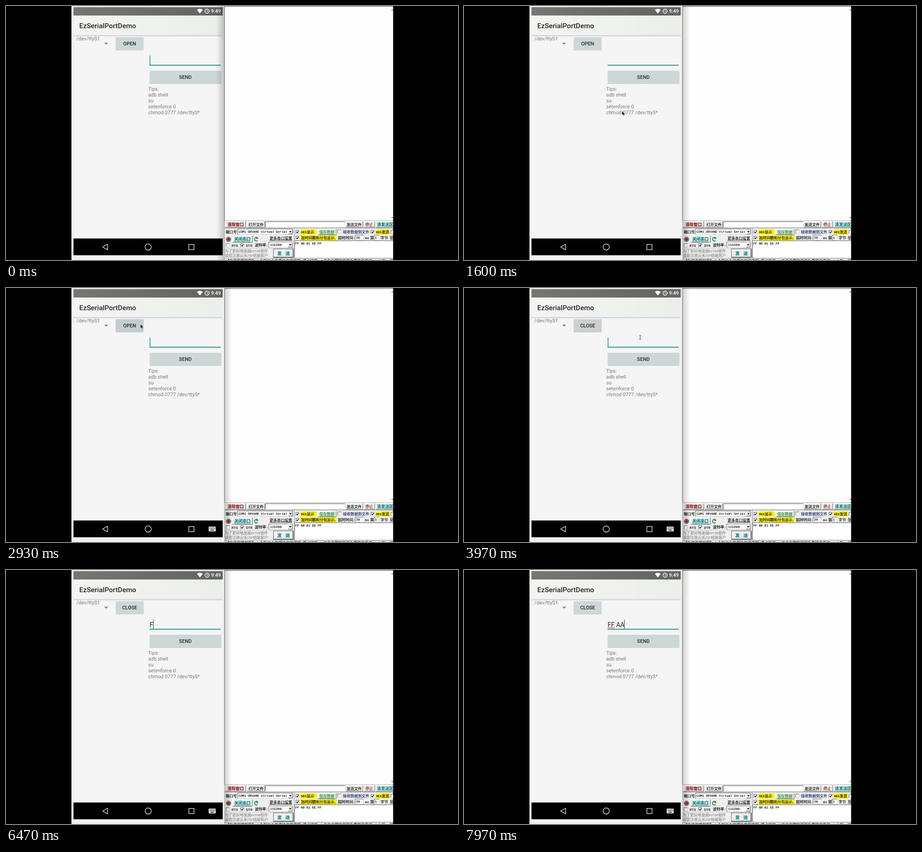
Animation, 998 px wide and 561 px high, one loop 8 s. Source, as an HTML page:

```html
<!DOCTYPE html>
<html lang="zh">
<head>
<meta charset="utf-8">
<title>Serial port demo</title>
<style>
html, body { margin: 0; width: 100%; height: 100%; overflow: hidden; background: #000; }
svg { display: block; width: 100%; height: 100%; }
text { white-space: pre; }
.ui { font-family: Roboto, sans-serif; }
.med { font-weight: 500; }
.cjk { font-family: "Noto Sans CJK SC", "Noto Sans CJK", "Noto Sans CJK JP", sans-serif; }
.mono { font-family: "Liberation Mono", monospace; }
</style>
</head>
<body>
<svg id="stage" viewBox="0 0 998 561">
  <defs>
    <linearGradient id="status"><stop offset="0" stop-color="#777670"/><stop offset="1" stop-color="#62645f"/></linearGradient>
    <linearGradient id="bar"><stop offset="0" stop-color="#f4f4f1"/><stop offset="1" stop-color="#ebefe9"/></linearGradient>
    <linearGradient id="drop" x2="0" y2="1"><stop offset="0" stop-color="#bfc5da"/><stop offset="1" stop-color="#f5f5f5"/></linearGradient>
    <linearGradient id="shadeLeft"><stop offset="0" stop-opacity="0"/><stop offset="1" stop-opacity=".2"/></linearGradient>
    <linearGradient id="shadeRight"><stop offset="0" stop-opacity=".17"/><stop offset="1" stop-opacity="0"/></linearGradient>
    <clipPath id="win"><rect x="144.5" width="710" height="561"/></clipPath>
  </defs>
  <g id="scene" clip-path="url(#win)"></g>
  <rect id="terminalShadow" x="464" width="18" height="561" fill="url(#shadeLeft)"/>
  <rect id="phoneShadow" x="483" width="16" height="561" fill="url(#shadeRight)"/>
  <text id="entry" class="ui" x="317" y="125.7" font-size="14" fill="#222"></text>
  <rect id="spell" x="317" y="126.8" width="15.5" height="1.7" fill="#ee7450"/>
  <rect id="caret" y="109.5" width="1.5" height="20.5" fill="#148a88"/>
  <path id="arrow" d="M0 0V9.2L2.1 7.3 3.6 10.6 5.2 9.9 3.8 6.8H6.5Z" fill="#111" stroke="#fff" stroke-width=".5"/>
  <path id="beam" d="M-2-4.5H-.6L0-4 .6-4.5H2M0-4V4M-2 4.5H-.6L0 4 .6 4.5H2" fill="none" stroke="#444" stroke-width="1"/>
</svg>
<script>
const $ = id => document.getElementById(id);
const LOOP = 8000;
const TEAL = '#087f86', RED = '#8e1d1d', INK = '#111';

const rect = (x, y, w, h, fill, more = '') =>
  `<rect x="${x}" y="${y}" width="${w}" height="${h}" fill="${fill}" ${more}/>`;
const path = (d, stroke, width = 1, more = 'fill="none"') =>
  `<path d="${d}" stroke="${stroke}" stroke-width="${width}" ${more}/>`;
const ui = (x, y, size, fill, str, more = 'class="ui"') =>
  `<text x="${x}" y="${y}" font-size="${size}" fill="${fill}" ${more}>${str}</text>`;

// Half-width Latin inside full-width Chinese, as in a bitmap system font.
function label(x, y, str, fill = INK, size = 8.3, more = '') {
  const runs = str.replace(/[ -~]+/g, s => `<tspan class="mono" font-size="${size * .83}">${s}</tspan>`);
  return `<text class="cjk" x="${x}" y="${y}" font-size="${size}" fill="${fill}" stroke="${fill}" stroke-width=".2" ${more}>${runs}</text>`;
}
const bold = 'font-weight="700"';
const rule = (x, y, w, color) => rect(x, y, w, .8, color);

const bevel = (x, y, w, h) => rect(x, y, w, h, '#efefed') +
  path(`M${x} ${y + h}V${y}H${x + w}`, '#fff') +
  path(`M${x} ${y + h}H${x + w}V${y}`, '#5c5d5f');
const field = (x, y, w, h) => rect(x, y, w, h, '#fff') +
  path(`M${x} ${y + h}V${y}H${x + w}`, '#58595b') +
  path(`M${x} ${y + h}H${x + w}V${y}`, '#c9c9c9');
const check = (x, y, on) => field(x, y, 7.5, 7.5) +
  (on ? path(`M${x + 1.6} ${y + 3.6}L${x + 3.2} ${y + 5.5} ${x + 6.2} ${y + 1.8}`, '#111', 1.5) : '');
const combo = (x, y, w, h) => field(x, y, w, h) + bevel(x + w - 10, y + 1, 9, h - 2) +
  `<path d="M${x + w - 8.3} ${y + h / 2 - 1.3}h5.6l-2.8 3.2z" fill="#111"/>`;

const button = (x, y, w, h, id) =>
  rect(x, y + 1, w, h, '#a9b1b2', 'rx="2" opacity=".55"') +
  rect(x, y, w, h, '#cdd8d6', `rx="2" id="${id}"`);

function phone() {
  const centered = 'class="ui med" text-anchor="middle"';
  const keys = [0, 1, 2, 3, 4].map(i =>
    rect(449.6 + i * 2.6, 528.6, 1.5, 1.5, '#111') + rect(449.6 + i * 2.6, 531.2, 1.5, 1.5, '#111')).join('');
  const tips = ['Tips:', 'adb shell', 'su', 'setenforce 0', 'chmod 0777 /dev/ttyS*'];
  return rect(144, 0, 338, 561, '#f0f0f0') +
    rect(149, 2, 329.5, 512, '#f5f5f5') +
    rect(149, 2.5, 329.5, 18.5, 'url(#status)') +
    rect(149, 21, 329.5, 44, 'url(#bar)') +
    rect(149, 64.5, 329.5, 3.5, 'url(#drop)') +
    '<path d="M421.5 8.6Q428 4 434.5 8.6L428 16.4Z" fill="#fff"/>' +
    '<circle cx="444" cy="11.3" r="4.6" fill="none" stroke="#fff" stroke-width="1.5"/>' +
    path('M444 8.8V11.6H446.2', '#fff', 1.1) +
    ui(452.5, 15.4, 10.97, '#fff', '9:49', 'class="ui med"') +
    ui(161.8, 48.6, 15.4, '#262729', 'EzSerialPortDemo', 'class="ui med"') +
    ui(155.3, 76.2, 11.2, '#77777a', '/dev/ttyS1') +
    '<path d="M217 81.2H225.2L221.1 85.3Z" fill="#747679"/>' +
    button(242, 69, 62, 28, 'toggle') +
    ui(273, 87, 10.97, '#252729', '', centered + ' id="toggleText"') +
    rect(317, 129.8, 157, 1.9, '#238c8f') +
    button(317, 143, 158.5, 28, 'send') +
    ui(396, 160.9, 10.97, '#252729', 'SEND', centered) +
    tips.map((s, i) => ui(314, 187 + i * 13, 10.97, '#77777a', s)).join('') +
    rect(149, 513.5, 329.5, 37, '#000') +
    path('M213.3 532.3L224.3 526.2V538.5Z', '#ccc', 1.5, 'fill="none" stroke-linejoin="round"') +
    '<circle cx="314" cy="532.3" r="6.8" fill="none" stroke="#ccc" stroke-width="1.6"/>' +
    rect(403.7, 526.7, 11.5, 11.5, 'none', 'stroke="#ccc" stroke-width="1.5"') +
    `<g id="ime">${rect(447.5, 527, 15.5, 10.5, '#f2f2f2', 'rx="1.2"')}${keys}${rect(451.5, 534.2, 7.5, 1.5, '#111')}</g>`;
}

function terminal() {
  return rect(482, 0, 373, 561, '#efefef') +
    rect(483, 2, 372, 471.5, '#fefefe') +
    path('M482.5 474V1.2H855', '#77787a', 1.3) +
    path('M482.5 474V561', '#a5a6a8') +
    path('M854.2 2V474', '#d8d8d8') +
    '<path d="M850.5 10L853 6.5 855 10ZM850.5 466H855L853 469.5Z" fill="#8a8b8d"/>' +
    path('M483 474H855', '#b4b4b4') +

    bevel(484, 476, 45.5, 13) + label(489, 485.8, '清除窗口', RED, 9, bold) +
    bevel(532, 476, 39, 13) + label(535.5, 485.8, '打开文件', INK, 8.4) +
    field(573, 476.5, 176, 12.5) +
    bevel(750, 476, 38, 13) + label(752, 485.8, '发送文件', INK, 8.4) +
    bevel(790, 476, 24, 13) + label(793.5, 485.8, '停止', RED, 8.6) +
    bevel(816, 476, 45, 13) + label(819, 485.8, '清发送区', TEAL, 9, bold) +
    path('M483 490.5H855', '#8b8c8e') +

    label(485, 501.6, '端口号') +
    combo(511.5, 492.5, 122, 12) + label(513.5, 500.8, 'COM1 ORVANE Virtual Serial') +
    path('M636.5 491V557', '#8b8c8e') +
    check(640, 495.5, true) + rect(650, 493.5, 36, 11, '#fff200') + label(651.5, 502.2, 'HEX显示') +
    bevel(688, 493, 41, 12.5) + label(691.8, 502.4, '保存数据', '#1a8a2c', 8.4) + rule(692, 503.6, 33, '#1a8a2c') +
    check(732.5, 494.5, false) + label(744, 501.8, '接收数据到文件', '#1c2a6b', 8.3) +
    check(806, 495.5, true) + rect(816, 493.5, 31.5, 11, '#fff200') + label(817, 502.2, 'HEX发送') +
    check(850, 495.5, false) +

    '<circle cx="491.3" cy="515.2" r="5.2" fill="#8d8583" stroke="#555"/>' +
    '<circle cx="491.3" cy="515.2" r="3" fill="#a51f22"/>' +
    bevel(500, 507, 44, 15) + label(504, 518, '关闭串口', TEAL, 9, bold) + rule(504, 520, 36, TEAL) +
    path('M555.5 512A4 4 0 1 0 555.5 518', '#178a3a', 1.9) +
    '<path d="M553 509.2L558 514 552.4 514.6Z" fill="#178a3a"/>' +
    label(582, 515.5, '更多串口设置') + rule(582, 517, 50, INK) +
    check(640, 508.5, true) + rect(650, 507, 80, 10.6, '#fff200') + label(651.5, 515.4, '加时间戳和分包显示,', INK, 8.2) +
    label(733, 515.4, '超时时间:') +
    field(771, 506, 19, 11) + label(773, 514.4, '20') + label(793, 515.4, 'ms') +
    label(804, 515.4, '第') + field(813, 506, 11, 11) + label(814.5, 514.4, '1') +
    label(827, 515.4, '字节') + label(847, 515.4, '至') +

    field(637, 518.5, 222, 38) + label(638.5, 526.5, 'FF 00 01 EE FF') +
    check(486, 525, false) + label(498, 531.6, 'RTS', INK, 9.6) +
    check(518, 525, true) + label(530, 531.6, 'DTR', INK, 9.6) +
    label(549.5, 531.4, '波特率:') +
    combo(580.5, 521, 52.5, 12.5) + label(583, 529.8, '115200', INK, 8.6) +
    path('M483 535H634', '#c4c4c4') +
    label(483, 544.4, '为了更好地发展KVTOR软件', '#8d8e90') +
    label(483, 554.4, '请您注册云禾川F结尾客户', '#8d8e90') +
    rect(590.5, 536.5, 44, 19, 'none', 'stroke="#555"') + bevel(591.5, 537.5, 42, 17) +
    label(599, 549.8, '发', TEAL, 9.6, bold) + label(617, 549.8, '送', TEAL, 9.6, bold) +
    path('M483 557.5H855', '#9b9c9e') +
    label(485, 566.3, '【升级到最新版】★全新工业级模块使用说明,请点这里 ★来自中国的开源免费操作系统 ★上新一代', INK, 8.3);
}

$('scene').innerHTML = phone() + terminal();

const track = [
  [800, 470, 330], [1400, 349, 232], [1900, 349, 232], [2600, 297, 80],
  [3200, 297, 80], [3800, 389, 109], [4200, 389, 109], [4700, 390, 116], [6400, 390, 116]
];
const strokes = [[6400, 'F'], [6620, 'FF'], [6960, 'FF '], [7640, 'FF A'], [7860, 'FF AA']];
const caretX = { '': 317.3, 'F': 324.7, 'FF': 332.2, 'FF ': 335, 'FF A': 344.2, 'FF AA': 353.2 };

function pointer(t) {
  const i = track.findIndex(k => k[0] > t);
  if (i < 1) return null;
  const [t0, x0, y0] = track[i - 1], [t1, x1, y1] = track[i];
  const u = (t - t0) / (t1 - t0), e = u * u * (3 - 2 * u);
  return [x0 + (x1 - x0) * e, y0 + (y1 - y0) * e];
}

const show = (id, on) => $(id).setAttribute('visibility', on ? 'visible' : 'hidden');

function render(t) {
  const last = strokes.filter(s => s[0] <= t).pop();
  const value = last ? last[1] : '';
  $('entry').textContent = value;
  $('caret').setAttribute('x', caretX[value]);
  show('caret', (last ? t - last[0] : t + 200) % 1000 < 500);
  show('spell', value.length > 2);

  const p = pointer(t);
  const inField = p && p[0] > 314 && p[0] < 476 && p[1] > 103 && p[1] < 134;
  show('arrow', p && !inField);
  show('beam', inField);
  if (p) $(inField ? 'beam' : 'arrow').setAttribute('transform', `translate(${p})`);

  // The active window casts its shadow on the other one.
  const phoneActive = t >= 1450;
  show('terminalShadow', !phoneActive);
  show('phoneShadow', phoneActive);

  const opened = t >= 3050;
  $('toggleText').textContent = opened ? 'CLOSE' : 'OPEN';
  $('toggle').setAttribute('fill', t < 2800 || t > 4400 ? '#cdd8d6' : opened ? '#cccfcf' : '#c3cccf');
  show('ime', t >= 2750);
}

const start = performance.now();
function tick() {
  render((performance.now() - start) % LOOP);
  requestAnimationFrame(tick);
}
tick();
</script>
</body>
</html>
```
